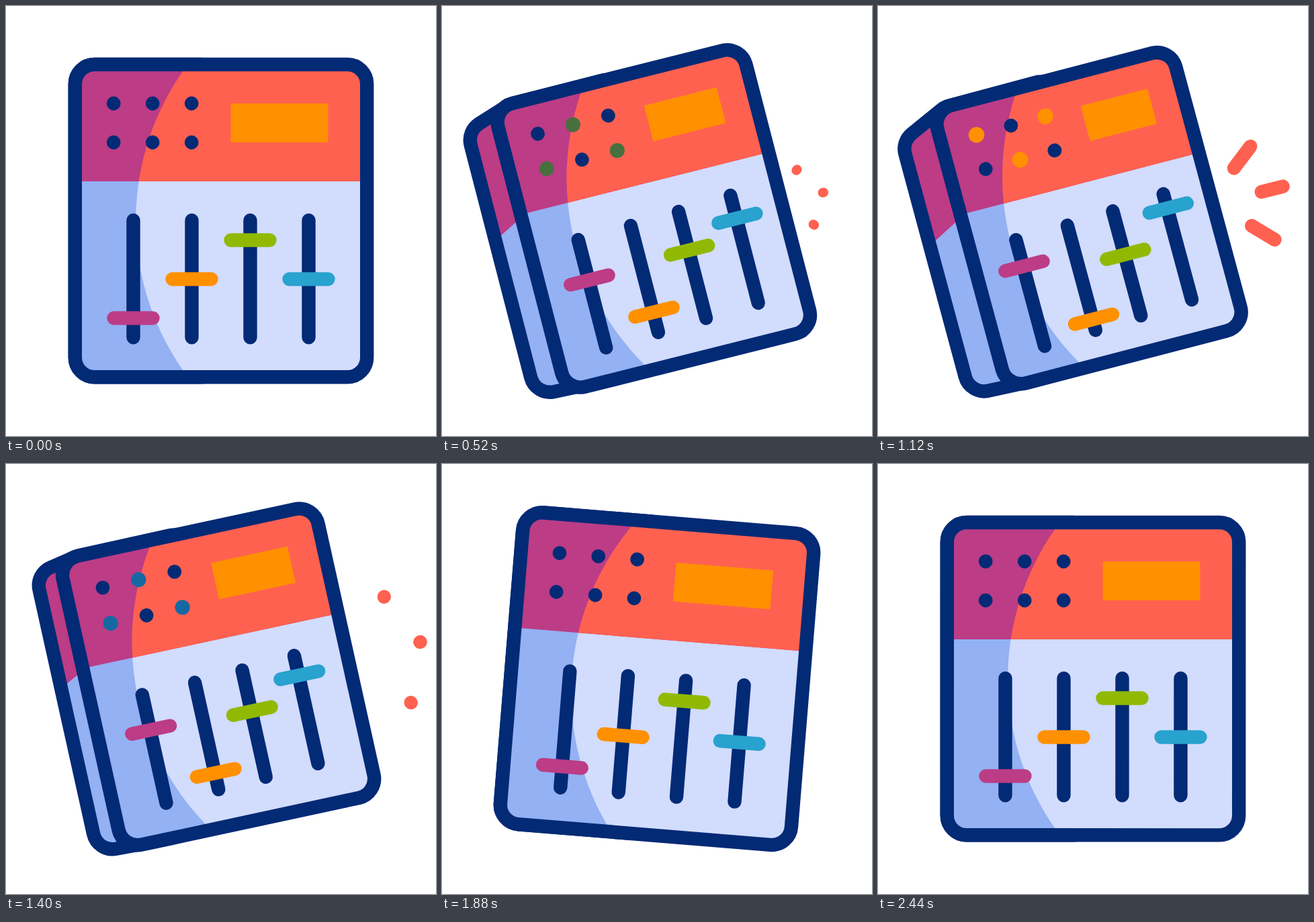
Recreate the animation shown at these times as an HTML page. Size 640 px wide and 640 px high, loop 2.48 s.

```html
<!DOCTYPE html>
<html lang="en">
<head>
<meta charset="utf-8">
<title>Mixer</title>
<style>
html, body { margin: 0; width: 100%; height: 100%; overflow: hidden; background: #fff; }
svg { display: block; width: 100vw; height: 100vh; }
line { stroke-linecap: round; stroke-width: 20.4; }
.line { fill: none; stroke: #032a75; stroke-width: 20.4; stroke-linejoin: round; }
</style>
</head>
<body>
<svg viewBox="0 0 640 640">
  <defs>
    <clipPath id="backClip"><path id="backArea"/></clipPath>
    <clipPath id="faceClip"><path id="faceArea"/></clipPath>
    <clipPath id="topClip"><path id="topArea"/></clipPath>
  </defs>
  <g id="rays"></g>
  <g id="body">
    <g clip-path="url(#backClip)">
      <rect x="-320" y="-320" width="640" height="640" fill="#93b1f3"/>
      <path id="sideTop" fill="#bc3c86"/>
    </g>
    <path id="backLine" class="line"/>
    <g clip-path="url(#faceClip)">
      <rect x="-320" y="-320" width="640" height="640" fill="#93b1f3"/>
      <circle id="lightLow" fill="#d2dcfd"/>
      <path id="top" fill="#bc3c86"/>
      <g clip-path="url(#topClip)"><circle id="lightTop" fill="#ff6150"/></g>
    </g>
    <path id="faceLine" class="line"/>
    <path id="screen" fill="#ff9000"/>
    <g id="lamps"></g>
    <g id="slots"></g>
    <g id="knobs"></g>
  </g>
</svg>
<script>
const LOOP = 2480;
const $ = id => document.getElementById(id);
const mix = (a, b, p) => a + (b - a) * p;
const clamp = x => Math.min(1, Math.max(0, x));

function set(el, attrs) {
  for (const k in attrs) el.setAttribute(k, attrs[k]);
}
function make(parent, tag, attrs = {}) {
  const el = document.createElementNS('http://www.w3.org/2000/svg', tag);
  set(el, attrs);
  return $(parent).appendChild(el);
}

// Cubic ease with control points (a,0) and (b,1)
function ease(t, start, end, a, b) {
  const x = (t - start) / (end - start);
  if (x <= 0 || x >= 1) return clamp(x);
  let lo = 0, hi = 1;
  for (let i = 0; i < 24; i++) {
    const s = (lo + hi) / 2, u = 1 - s;
    if (3 * a * s * u * u + 3 * b * s * s * u + s * s * s < x) lo = s; else hi = s;
  }
  return lo * lo * (3 - 2 * lo);
}

// Coordinates are relative to the stage centre; "open" is the tilted, thick pose
const poly = pts => 'M' + pts.map(q => q.join(' ')).join('L') + 'Z';
const blend = (a, b, p) => a.map((v, i) => mix(v, b[i], p));
const TILT = .009;

// Corners of a box whose level edges lean as it opens
function box(shut, open, p) {
  const [l, t, r, b] = blend(shut, open, p);
  const lean = (r - l) / 2 * TILT * p;
  return [[l, t - lean], [r, t + lean], [r, b + lean], [l, b - lean]];
}

// Closed clockwise polygon with rounded corners
function rounded(pts, r) {
  const unit = (p, q) => {
    const d = Math.hypot(q[0] - p[0], q[1] - p[1]);
    return [(q[0] - p[0]) / d, (q[1] - p[1]) / d];
  };
  return pts.map((p, i) => {
    const n = pts.length, a = unit(pts[(i + n - 1) % n], p), b = unit(p, pts[(i + 1) % n]);
    const turn = Math.atan2(a[0] * b[1] - a[1] * b[0], a[0] * b[0] + a[1] * b[1]);
    const d = r * Math.tan(Math.abs(turn) / 2);
    return `${i ? 'L' : 'M'}${p[0] - a[0] * d} ${p[1] - a[1] * d}` +
      `A${r} ${r} 0 0 ${turn > 0 ? 1 : 0} ${p[0] + b[0] * d} ${p[1] + b[1] * d}`;
  }).join('') + 'Z';
}

const SHUT = [-217.2, -233, 217.2, 232.3], OPEN = [-188, -219.7, 178.7, 208.4];
const GAP = 58, NAVY = [3, 42, 117];

// Open slot x, knob height shut (in gaps) and open, colour
const faders = [
  [-118, 1, 38.2, '#bc3c86'],
  [-38.6, 0, 141.4, '#ff9000'],
  [32.2, -1, 60.6, '#91b904'],
  [111.5, 0, 10.5, '#28a2ce']
].map(([openX, step, openY, stroke], i) => ({
  i, openX, openY,
  x: (i - 1.5) * 1.5 * GAP,
  y: 86.5 + step * GAP,
  slot: make('slots', 'line', { class: 'line' }),
  knob: make('knobs', 'line', { stroke })
}));

const lamps = Array.from({ length: 6 }, () => make('lamps', 'circle'));

// Which lamps, on, off, colour
const flashes = [
  [1, 160, 480, [145, 185, 4]],
  [0, 520, 1240, [255, 144, 0]],
  [1, 1360, 1720, [40, 162, 206]]
];

// Start point, angle, length
const rays = [[527.3, 244.8, -53, 41.5], [566.5, 277.8, -14.4, 34], [552.5, 325, 31, 41]]
  .map(([x, y, angle, len]) => ({
    len,
    el: make('rays', 'line', { stroke: '#ff6150', transform: `translate(${x} ${y}) rotate(${angle})` })
  }));

function drawCase(pf, ps) {
  // The upper corner of the side drops late
  const left = mix(SHUT[0], -244, ps), base = mix(SHUT[3], 202, ps);
  const f = box(SHUT, OPEN, ps);
  const side = [
    [left, mix(SHUT[1], -188, ps * ps)], [-169, f[0][1]], [0, f[0][1]],
    [0, f[3][1]], [-150, f[3][1]], [left, base]
  ];
  const backPath = rounded(side, 29), facePath = rounded(box(SHUT, OPEN, pf), 29);
  for (const id of ['backArea', 'backLine']) $(id).setAttribute('d', backPath);
  for (const id of ['faceArea', 'faceLine']) $(id).setAttribute('d', facePath);

  const seam = mix(-59, -27.6, ps), edge = mix(-59, -56.3, ps);
  $('sideTop').setAttribute('d',
    poly([[-320, -320], [0, -320], [0, edge], [f[0][0], edge], [left, seam], [-320, seam]]));

  const band = poly(box([SHUT[0], -320, SHUT[2], -59], [OPEN[0], -320, OPEN[2], -58.6], pf));
  for (const id of ['top', 'topArea']) $(id).setAttribute('d', band);
  const disc = { cx: mix(261.6, 266, pf), cy: mix(-.5, 3, pf), r: mix(388.4, 392.6, pf) };
  set($('lightLow'), disc);
  set($('lightTop'), disc);
  $('screen').setAttribute('d',
    poly(box([14.5, -175, 159.3, -117], [26.8, -169.7, 129.5, -115.5], pf)));
}

function drawLamps(t, pf) {
  lamps.forEach((el, i) => {
    let color = NAVY, lit = 0;
    for (const [odd, on, off, hue] of flashes) {
      const k = clamp((t - on) / 80) * clamp((off + 80 - t) / 80);
      if (i % 2 === odd && k > 0) {
        lit = k;
        color = blend(NAVY, hue, k).map(Math.round);
      }
    }
    const x = -159.8 + i % 3 * GAP, y = i < 3 ? -175 : -117;
    set(el, {
      cx: mix(x, x * .916 + 12.3, pf), cy: mix(y, y * .907 - 10.1, pf),
      r: 10.4 + 1.4 * lit, fill: `rgb(${color})`
    });
  });
}

function drawFaders(p) {
  for (const { i, x, y, openX, openY, slot, knob } of faders) {
    const sx = mix(x, openX, p), kx = sx + 1.5 * p, ky = mix(y, openY, p), lean = .3 * p;
    set(slot, { x1: sx, x2: sx, y1: mix(-1, -2.6 - i * i, p), y2: mix(173.3, 161 - 3.2 * i, p) });
    set(knob, { x1: kx - 29, x2: kx + 29, y1: ky - lean, y2: ky + lean });
  }
}

function drawRays(t) {
  const grow = ease(t, 500, 740, .2, .6);
  const drift = clamp((t - 760) / 360);
  const out = ease(t, 1120, 1420, .4, .7);
  const width = 20.4 * clamp((t - 480) / 60) * clamp((1460 - t) / 60);
  for (const { len, el } of rays) {
    set(el, {
      x1: mix(4.3 * drift, len + 18, out),
      x2: mix(len * grow + 3.3 * drift, len + 18, out) + .01,
      visibility: width > 0 ? 'visible' : 'hidden'
    });
    el.style.strokeWidth = width;
  }
}

function draw(t) {
  const rise = ease(t, 0, 760, .815, .414);
  const back = ease(t, 1160, 2000, .55, .5);
  const shrink = 1 - ease(t, 1120, 1860, .35, .634);
  const swing = -18.2 * rise + 3.2 * ease(t, 760, 1160, .33, .67)
    + 20.3 * back - 5.3 * ease(t, 2000, 2460, .25, .4);
  $('body').setAttribute('transform', `translate(320 320) rotate(${swing})`);
  drawCase(rise * shrink, ease(t, 0, 760, .6, .4) * shrink);
  drawLamps(t, rise * shrink);
  drawFaders(rise * (1 - back));
  drawRays(t);
}

function frame() {
  draw(performance.now() % LOOP);
  requestAnimationFrame(frame);
}
frame();
</script>
</body>
</html>
```
